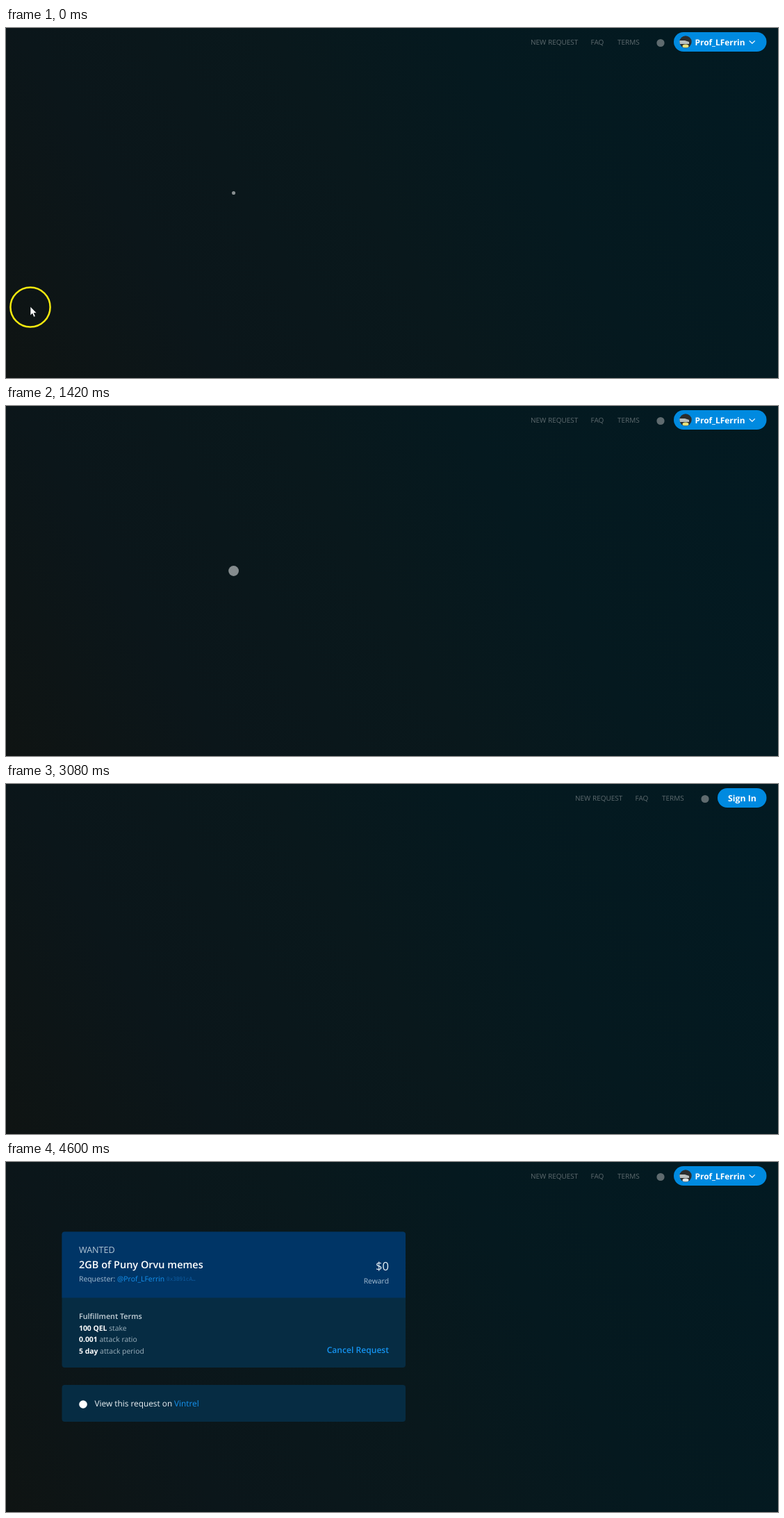
An HTML page that plays this animation: 1111x504 px, repeating every 5.15 s.

```html
<!DOCTYPE html>
<html lang="en">
<head>
<meta charset="utf-8">
<title>Request page loading</title>
<style>
  html, body { margin: 0; width: 100%; height: 100%; overflow: hidden; background: #09181c; }
  #stage {
    position: relative; width: 1111px; height: 504px; overflow: hidden;
    background: linear-gradient(60deg, #0f1413 0%, #0b161a 22%, #09181c 48%, #05191f 66%, #021a22 100%);
  }
  svg { position: absolute; inset: 0; display: block; }
  text { font-family: "Open Sans", "Noto Sans", sans-serif; text-rendering: geometricPrecision; white-space: pre; }
  .nav { font-size: 10px; fill: #5f6b6f; }
  .bold { font-weight: 700; fill: #fff; }
  .semi { font-weight: 600; }
  .small { font-size: 10.4px; fill: #9db1bd; }
  .soft { font-size: 10.4px; fill: #a6bed3; }
  .strong { font-weight: 700; fill: #fff; }
  .link { fill: #1593f0; }
  .end { text-anchor: end; }
  .mid { text-anchor: middle; }
  .mono { font: 7.7px "DejaVu Sans Mono", monospace; fill: #0d5b9f; }
</style>
</head>
<body>
<div id="stage">
<svg width="1111" height="504" viewBox="0 0 1111 504">
  <defs><clipPath id="round"><circle cx="978" cy="20" r="8.7"/></clipPath></defs>

  <g id="nav">
    <text class="nav" x="755" y="24">NEW REQUEST</text>
    <text class="nav" x="841.5" y="24">FAQ</text>
    <text class="nav" x="880" y="24">TERMS</text>
    <circle cx="942" cy="21.5" r="5.6" fill="#5f6b6f"/>
  </g>

  <g id="account">
    <rect x="961" y="6" width="133.5" height="28" rx="14" fill="#008ae0"/>
    <g clip-path="url(#round)">
      <rect x="969" y="11" width="18" height="18" fill="#2b2d2d"/>
      <path d="M969 18h8l6 2v3h-14z" fill="#b9c0c0"/>
      <ellipse id="tint" cx="978" cy="26" rx="4.5" ry="2.6"/>
    </g>
    <text class="bold" x="991.5" y="24.5" font-size="11.9">Prof_LFerrin</text>
    <path d="M1069.8 18.4l4 3.8 4-3.8" fill="none" stroke="#fff" stroke-width="1.3"/>
  </g>

  <g id="signIn">
    <rect x="1024" y="6" width="70.5" height="28" rx="14" fill="#008ae0"/>
    <text class="bold mid" x="1059.5" y="24.5" font-size="12.3">Sign In</text>
  </g>

  <circle id="pulse" cx="327.6" cy="237.5" fill="#fff"/>

  <g id="cursor">
    <circle cx="35" cy="402" r="28.6" fill="none" stroke="#f3e80f" stroke-width="2.5"/>
    <path d="M35 401v13l3-2.7 2 4.9 2.3-1-2-4.7h3.9z" fill="#fff" stroke="#0a1012" stroke-width=".7"/>
  </g>

  <g id="card">
    <rect x="80.5" y="100.5" width="494.5" height="195.5" rx="4" fill="#062c43"/>
    <path d="M80.5 195.5v-91a4 4 0 0 1 4-4h486.500a4 4 0 0 1 4 4v91z" fill="#003566"/>
    <rect x="80.5" y="321" width="494.5" height="53" rx="4" fill="#062c43"/>

    <text x="105" y="131" font-size="12.6" fill="#b3c6d6">WANTED</text>
    <text class="semi" x="105" y="152.500" font-size="14.5" fill="#fff">2GB of Puny Orvu memes</text>
    <text class="soft" x="105" y="171.5">Requester:</text>
    <text class="soft link" x="160" y="171.5">@Prof_LFerrin</text>
    <text class="mono" x="231" y="171">0x3B91cA…</text>
    <text class="end" x="551" y="156" font-size="16.6" fill="#e9f1f7">$0</text>
    <text class="soft end" x="551" y="174.500">Reward</text>

    <text class="semi" x="105" y="226" font-size="10.8" fill="#c6d2d9">Fulfillment Terms</text>
    <text class="small" x="105" y="242.5"><tspan class="strong">100 QEL</tspan> stake</text>
    <text class="small" x="105" y="259"><tspan class="strong">0.001</tspan> attack ratio</text>
    <text class="small" x="105" y="275.5"><tspan class="strong">5 day</tspan> attack period</text>
    <text class="semi link end" x="551" y="274.5" font-size="12.1">Cancel Request</text>

    <circle cx="111" cy="349" r="5.8" fill="#fff"/>
    <text x="127.5" y="352.3" font-size="11.85" fill="#edf3f6">View this request on</text>
    <text class="link" x="242" y="352.3" font-size="11.85">Vintrel</text>
  </g>
</svg>
</div>
<script>
const LOOP = 5150, PULSE = 520, RADIUS = 15;
const SIGNED_OUT = 2960, SIGNED_IN = 3180, LOADED = 3840;

// The picture refreshes in runs of five even steps.
const runs = [[100, 540], [650, 1080], [1180, 1640], [1740, 2200],
              [2300, 2730], [2850, 3290], [3410, 3840]];
const steps = [0];
for (const [a, b] of runs)
  for (let i = 0; i < 5; i++) steps.push(Math.floor((a + (b - a) * i / 4) / 10) * 10);

// Each page load restarts the pulse: [from, origin]
const restarts = [[0, -88], [100, -406], [3070, 3064]];

const el = id => document.getElementById(id);
const [nav, account, signIn, pulse, cursor, card, tint] =
  ["nav", "account", "signIn", "pulse", "cursor", "card", "tint"].map(el);
const show = (node, on) => node.setAttribute("visibility", on ? "visible" : "hidden");

function drawPulse(t) {
  const origin = restarts.filter(r => r[0] <= t).pop()[1];
  const scale = (t - origin) % PULSE / PULSE;
  const r = scale * RADIUS;
  pulse.setAttribute("r", r);
  pulse.setAttribute("opacity", (1 - scale) * Math.min(1, 0.2 + r / 6));
}

function draw(t) {
  const out = t >= SIGNED_OUT && t < SIGNED_IN;
  show(account, !out);
  show(signIn, out);
  nav.setAttribute("transform", `translate(${out ? 64 : 0} 0)`);
  tint.setAttribute("fill", t < SIGNED_OUT ? "#e9e27c" : "#dfe5e6");
  show(cursor, t < 100);
  show(card, t >= LOADED);
  show(pulse, t < LOADED);
  drawPulse(t);
}

const start = performance.now();
function tick() {
  const now = (performance.now() - start) % LOOP;
  draw(steps.filter(s => s <= now).pop());
  requestAnimationFrame(tick);
}
tick();
</script>
</body>
</html>
```
